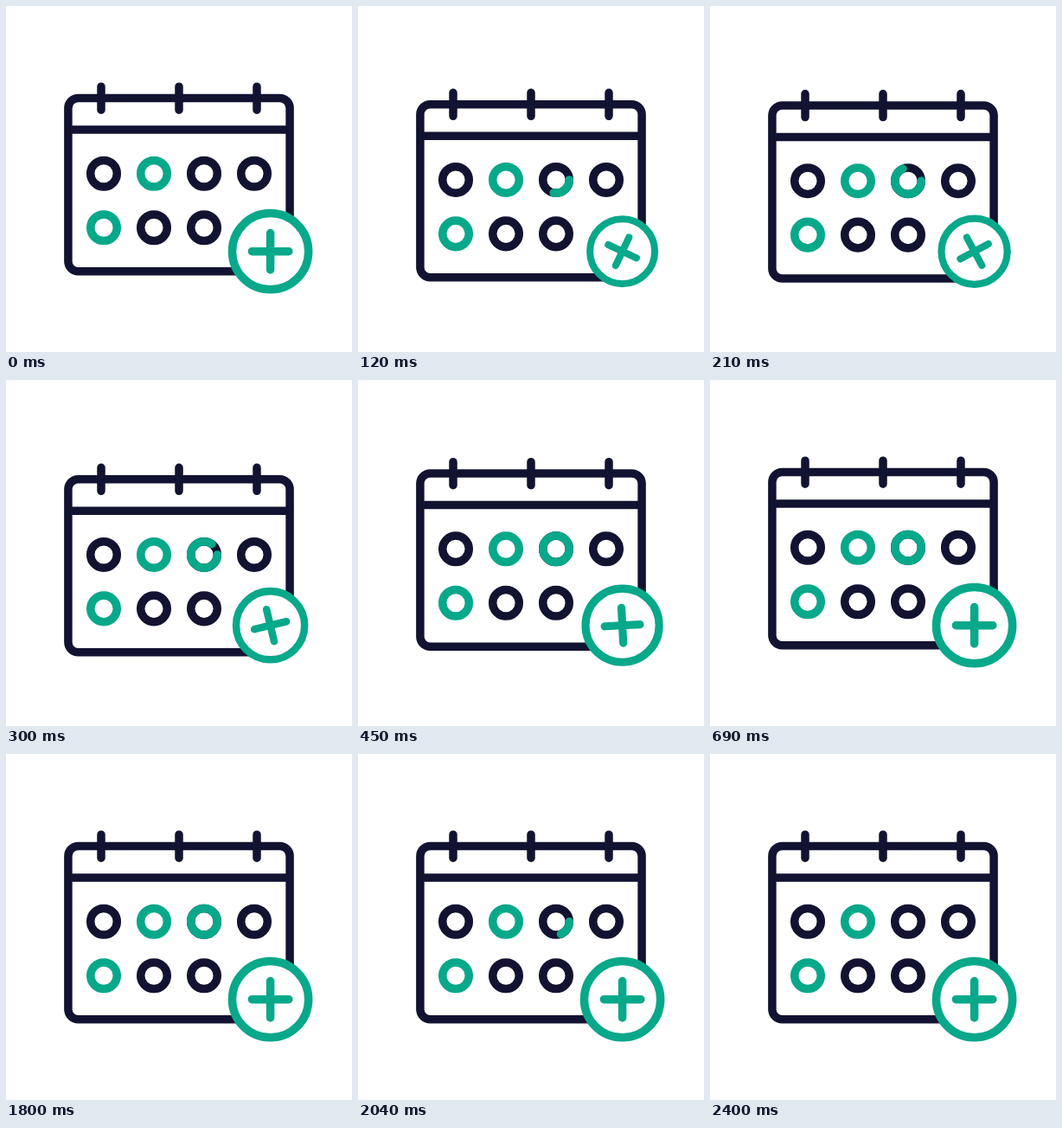
These frames come from a looping animation (400 by 400 pixels, 3.43 s). An HTML page:

```html
<!DOCTYPE html>
<html lang="en">
<head>
<meta charset="utf-8">
<title>Add to calendar</title>
<style>
  html, body { margin: 0; width: 100%; height: 100%; overflow: hidden; background: #fff; }
  svg { display: block; width: 100vw; height: 100vh; fill: none; stroke-width: 9.5; }
  .dark { stroke: #121331; }
  .green { stroke: #08a88a; }
  .round { stroke-linecap: round; }
</style>
</head>
<body>
<svg viewBox="0 0 400 400">
  <g id="calendar" class="dark">
    <rect x="71.9" y="106.6" width="256.2" height="200.1" rx="11.5"/>
    <path d="M72 143H328"/>
    <path class="round" d="M110 93.2V120.2M200 93.2V120.2M290 93.2V120.2"/>
    <g id="days"></g>
    <path id="sweep" class="green round" pathLength="100"
      d="M244.3 193.8a15.3 15.3 0 1 1 -30.6 0a15.3 15.3 0 1 1 30.6 0"/>
  </g>
  <g id="badge" class="green round">
    <circle r="44.1" fill="#fff"/>
    <path id="plus" d="M-21.2 0H21.2M0 -21.2V21.2"/>
  </g>
</svg>
<script>
const LOOP = 3430, STEP = 30;
const $ = id => document.getElementById(id);
const calendar = $('calendar'), sweep = $('sweep'), badge = $('badge'), plus = $('plus');

const greenDays = ['1,0', '0,1'];
for (let row = 0; row < 2; row++) {
  for (let col = 0; col < 4 - row; col++) {
    const day = document.createElementNS('http://www.w3.org/2000/svg', 'circle');
    day.setAttribute('cx', 113 + col * 58);
    day.setAttribute('cy', 193.8 + row * 62.4);
    day.setAttribute('r', 15.3);
    if (greenDays.includes(col + ',' + row)) day.setAttribute('class', 'green');
    $('days').append(day);
  }
}

const clamp = x => Math.min(1, Math.max(0, x));
const smooth = x => x * x * (3 - 2 * x);

// cubic-bezier(1/3, 0, 0, 1), solved by bisection
function settle(x) {
  let lo = 0, hi = 1;
  for (let i = 0; i < 24; i++) {
    const u = (lo + hi) / 2;
    if (u * (1 - u) ** 2 + u ** 3 < x) lo = u; else hi = u;
  }
  return x <= 0 ? 0 : x >= 1 ? 1 : smooth(lo);
}

const ramp = (t, from, to, ease) => ease(clamp((t - from) / (to - from)));
const bump = (t, peak, end, ease) => ramp(t, 0, peak, ease) - ramp(t, peak, end, ease);

function draw(now) {
  const t = Math.floor((now % LOOP) / STEP) * STEP;
  const fill = ramp(t, 0, 630, settle);
  const shown = 100 * (fill - ramp(t, 1770, 2400, settle));
  const drop = 8.5 * bump(t, 258, 690, settle);
  const scale = 1 - 0.15 * bump(t, 120, 600, smooth);

  calendar.setAttribute('transform', `translate(0 ${drop})`);
  badge.setAttribute('transform', `translate(305.6 283.7) scale(${scale})`);
  plus.setAttribute('transform', `rotate(${90 * fill})`);
  sweep.style.display = shown > 0 ? '' : 'none';
  sweep.setAttribute('stroke-dasharray', shown >= 100 ? 'none' : `${shown} 200`);
}

const start = performance.now();
function tick() {
  draw(performance.now() - start);
  requestAnimationFrame(tick);
}
tick();
</script>
</body>
</html>
```
